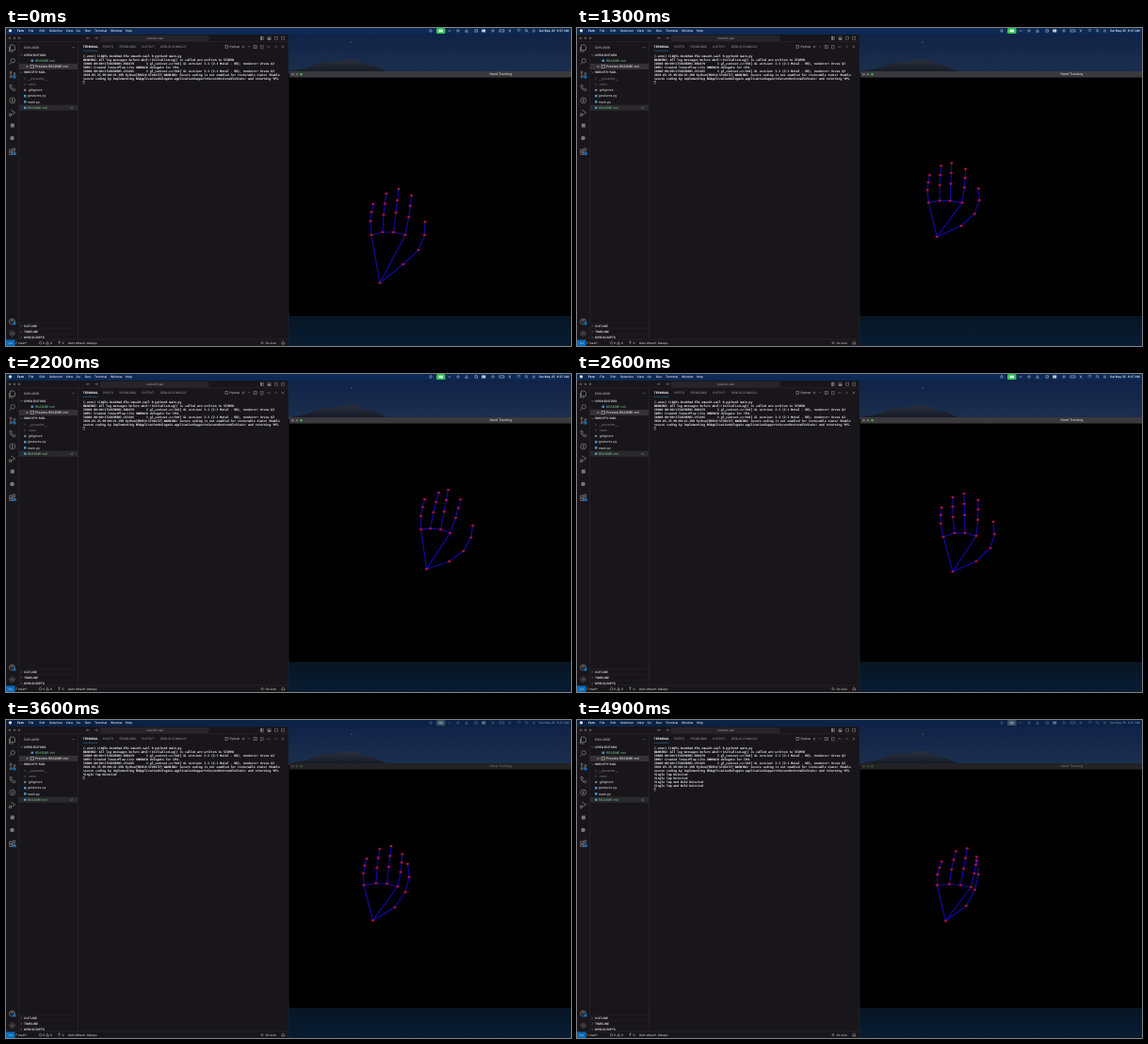
Write an HTML page that moves like this. It is 600 px wide and 338 px high and loops after 5 s.

```html
<!DOCTYPE html>
<html lang="en">
<head>
<meta charset="utf-8">
<title>Hand tracking desktop</title>
<style>
  html, body { margin: 0; width: 100%; height: 100%; overflow: hidden; background: #000; }
  svg { display: block; width: 100vw; height: 100vh; }
  text { font: 500 3.2px Inter, sans-serif; fill: #ccc; white-space: pre; text-rendering: geometricPrecision; }
  .b { font-weight: 700; }
  .m { font: 3.1px "DejaVu Sans Mono", "Liberation Mono", monospace; fill: #eee; stroke: #eee; stroke-width: .12; }
  .s { font-size: 3.45px; }
  .i { fill: none; stroke: #858585; stroke-width: .55; }
  .w { stroke: #c3cad6; }
</style>
</head>
<body>
<svg viewBox="0 0 600 338" preserveAspectRatio="none">
  <defs>
    <linearGradient id="sky" x1="0" y1="0" x2="0" y2="1">
      <stop offset="0" stop-color="#0f2145"/><stop offset="1" stop-color="#1b2f4e"/>
    </linearGradient>
    <linearGradient id="sea" x1="0" y1="0" x2="0" y2="1">
      <stop offset="0" stop-color="#081420"/><stop offset=".4" stop-color="#07182a"/><stop offset="1" stop-color="#091c31"/>
    </linearGradient>
    <linearGradient id="rock" x1="0" y1="0" x2="0" y2="1">
      <stop offset="0" stop-color="#2b303c"/><stop offset="1" stop-color="#151b27"/>
    </linearGradient>
  </defs>

  <!-- wallpaper -->
  <rect width="600" height="48" fill="url(#sky)"/>
  <rect y="304" width="600" height="34" fill="url(#sea)"/>
  <path d="M301 46L318 43 331 38 340 36 352 35.500 362 33 371 33.500 381 38 392 40.500 404 46Z" fill="url(#rock)"/>
  <g fill="#7f8ea3"><circle cx="367" cy="15" r=".6"/><circle cx="437" cy="13" r=".3"/></g>

  <!-- menu bar -->
  <rect id="bar" width="600" height="6.5" fill="#0c2a55"/>
  <circle cx="4.5" cy="2.8" r="1.6" fill="#e8ecf0"/>
  <g id="menu"></g>
  <g id="tray">
    <rect id="cam" x="457" y="0" width="9.5" height="6" rx="1.5" fill="#2fc653"/>
    <rect x="459.5" y="1.8" width="4.5" height="2.5" rx=".6" fill="#e9fff0"/>
    <g class="i w">
      <circle cx="451" cy="2.9" r="1.3"/><path d="M469.500 3h3"/>
      <circle cx="480" cy="2.9" r="1.2"/><path d="M487.500 4.200l1.500-2.600 1.500 2.600zM498 1.700h2.500v2.500H498z"/>
      <path d="M505.500 1.700h3.500v2.500h-3.500z" fill="#c3cad6"/>
      <circle cx="517" cy="2.9" r="1.2"/><path d="M524 1.800h5v2.200h-5zM534 1.500l2 2.800M536 1.500l-2 2.800"/>
      <path d="M542.500 2.200q2-1.600 4 0M543.500 3.500q1-.8 2 0"/>
      <circle cx="552.500" cy="2.600" r="1.100"/><path d="M553.400 3.500l1.100 1.100M559 2.200h3M559 3.800h3"/>
    </g>
  </g>

  <!-- editor window -->
  <rect y="7" width="300" height="331" fill="#18161a"/>
  <path d="M0 14.500H300M13.500 14.500V331M76.500 14.500V331M0 331H300M300 7V338" stroke="#2a282c" stroke-width=".5"/>
  <g fill="#525157"><circle cx="4" cy="10.800" r="1.400"/><circle cx="9" cy="10.800" r="1.400"/><circle cx="14" cy="10.800" r="1.400"/></g>
  <rect x="100" y="8.300" width="115" height="5.200" rx="1.200" fill="#262428" stroke="#363438" stroke-width=".4"/>
  <g class="i">
    <path d="M89 10.800h-3.500l1.300-1.300M85.500 10.800l1.300 1.300M94 10.800h3.500l-1.300-1.300M97.500 10.800l-1.300 1.300"/>
    <path d="M270.500 9.300h3v3h-3zM278 9.300h3v3h-3zM285.500 9.300h3v3h-3zM292.500 9.300h3v3h-3z"/>
    <path d="M270.500 9.300h1.300v3h-1.300zM278 11h3v1.300h-3z" fill="#858585"/>
    <path d="M252 18.400v3.200M250.400 20h3.200M257 19.300l1 1 1-1M263 18.500h3.500v3h-3.500zM264.700 18.500v3M270 18.700h3.500M270.500 18.700v3.200h2.500v-3.200M277 20h3.500M285 20.700l1.500-1.400 1.500 1.400M292.500 18.700l2.600 2.600M295.100 18.700l-2.600 2.600"/>
    <path d="M70 20.500h3.500" stroke-dasharray=".7 .6"/>
  </g>

  <!-- activity bar -->
  <g class="i" style="stroke-width:.7">
    <path d="M4.500 18h3.500l1.500 1.500v4h-5zM3.500 20v5h4.500"/>
    <circle cx="7.200" cy="34.800" r="2.200"/><path d="M5.600 36.500l-2.200 2.300"/>
    <circle cx="5" cy="47" r="1"/><circle cx="5" cy="52" r="1"/><circle cx="9" cy="48.500" r="1"/><path d="M5 48v3M9 49.500q0 1.500-3 1.800"/>
    <path d="M4 60.500l1.500-.3 1 1.900-1 1q.8 1.500 2 2l1.200-.9 1.500 1.300-1 1.300Q4 66 4 60.500z"/>
    <circle cx="6.800" cy="77" r="3"/><path d="M7.400 75l-1.400 2.200h1.600l-1.400 2.100"/>
    <path d="M5 87l4.700 2.900L5 92.800M3.500 91h2v2.500h-2z"/>
    <path d="M3.700 129h2.600v2.600h-2.600zM3.700 132h2.600v2.600h-2.600zM6.700 132h2.600v2.600h-2.600zM7.300 128h2.400v2.400h-2.400z"/>
    <circle cx="6.500" cy="312" r="3"/><circle cx="6.500" cy="311" r="1"/>
    <circle cx="6.500" cy="324.700" r="2.700" stroke-dasharray="1.200 .7"/><circle cx="6.500" cy="324.700" r="1"/>
  </g>
  <g fill="#77767a"><rect x="4.800" y="101.600" width="4" height="4"/><circle cx="6.500" cy="117" r="2.300"/></g>
  <g fill="#0a6cba"><circle cx="9" cy="52" r="1.800"/><circle cx="9.300" cy="133.500" r="1.800"/><circle cx="9" cy="314" r="1.800"/><rect y="331.500" width="9.500" height="6.500"/></g>

  <!-- explorer -->
  <rect x="13.800" y="37.900" width="62.400" height="6.100" fill="#343236"/>
  <rect x="13.800" y="81.700" width="62.400" height="6.100" fill="#2a292c"/>
  <path d="M13.800 313.500H76M13.800 319.700H76M13.800 325.800H76" stroke="#2a282c" stroke-width=".4"/>
  <g class="i">
    <path d="M15.300 28l1.200 1.300 1.200-1.300M15.300 46.400l1.200 1.300 1.200-1.300"/>
    <path d="M19.400 52.700l1.100 1.100-1.100 1.100M19.400 58.900l1.100 1.100-1.100 1.100"/>
    <path d="M15.600 315.400l1.200 1.200-1.200 1.200M15.600 321.500l1.200 1.200-1.200 1.200M15.600 327.600l1.200 1.200-1.200 1.200"/>
    <path d="M21.500 40l1.800 1.800M23.300 40l-1.800 1.800M26 39.500h3.500v2.800H26z" stroke="#c8c8c8"/>
  </g>
  <g fill="#4b93c8"><rect x="26.500" y="33.600" width="2.600" height="2.300"/><rect x="19" y="71" width="2.500" height="2.500"/><rect x="19" y="77.200" width="2.500" height="2.500"/><rect x="19" y="83.600" width="2.600" height="2.300"/></g>
  <circle cx="20.200" cy="66" r="1.200" fill="#7c8489"/>
  <path d="M81.500 24.300H97.500" stroke="#2a78b8" stroke-width=".5"/>
  <rect x="233" y="18.600" width="2.700" height="2.700" fill="none" stroke="#aaa" stroke-width=".5"/>
  <g class="i" style="stroke:#aaa">
    <circle cx="36.500" cy="334.700" r="1.300"/><path d="M42.500 336l1.500-2.700 1.500 2.700zM56.500 333v3.200M55.200 334l1.300-1 1.300 1M11.500 333l-.9 3"/>
    <circle cx="272" cy="334.700" r="1.100"/><path d="M292.700 336h3.200l-.6-2.200q-1-1.400-2 0z"/>
  </g>
  <g id="ui"></g>
  <g id="term"></g>
  <rect id="cursor" x="82" width="1.500" height="3.400" fill="none" stroke="#aaa" stroke-width=".4"/>

  <!-- tracking window -->
  <rect x="301" y="46" width="299" height="260" fill="#000"/>
  <rect id="head" x="301" y="46" width="299" height="6.600" fill="#3a393b"/>
  <g id="lights"><circle cx="304.500" cy="49.300" r="1.300" fill="#77716f"/><circle cx="309" cy="49.300" r="1.300" fill="#6b6b6b"/><circle cx="313.500" cy="49.300" r="1.300" fill="#46b052"/></g>
  <g id="title"></g>
  <path id="bones" fill="none" stroke="#1409a6" stroke-width="1.150" stroke-linejoin="round"/>
  <g id="dots" fill="#a5123f"></g>
</svg>

<script>
const NS = 'http://www.w3.org/2000/svg';
const $ = id => document.getElementById(id);

function add(parent, tag, attrs, str) {
  const el = document.createElementNS(NS, tag);
  for (const k in attrs) el.setAttribute(k, attrs[k]);
  if (str) el.textContent = str;
  return parent.appendChild(el);
}
// Baseline sits just below the given centre line.
function label(parent, x, y, str, cls = '', fill = '') {
  return add(parent, 'text', { x, y: y + 1.15, class: cls, style: fill && 'fill:' + fill }, str);
}

const menu = $('menu'), ui = $('ui'), term = $('term');
label(menu, 12, 2.8, 'Fern', 'b', '#fff');
[[24, 'File'], [35.5, 'Edit'], [46, 'Selection'], [63.5, 'View'], [74.5, 'Go'], [84, 'Run'],
 [94, 'Terminal'], [111, 'Window'], [127, 'Help']]
  .forEach(([x, s]) => label(menu, x, 2.8, s, '', '#f0f3f6'));
label($('tray'), 566, 2.8, 'Sat May 25  9:07 AM', '', '#fff');

label(ui, 149, 10.9, 'smooth-sail', '', '#9a9a9a');
label(ui, 19, 20.6, 'EXPLORER', '', '#b8b8b8');
label(ui, 19, 28.8, 'OPEN EDITORS', 'b');
label(ui, 31, 34.7, 'README.md', 's', '#6fb98a');
label(ui, 31, 41, 'Preview README.md', 's', '#e2e2e2');
label(ui, 19, 47.2, 'SMOOTH-SAIL', 'b');
[['__pycache__', '#777'], ['.venv', '#777'], ['.gitignore', '#ccc'], ['gestures.py', '#ccc'],
 ['main.py', '#ccc'], ['README.md', '#6fb98a']]
  .forEach(([s, c], i) => label(ui, 23, 53.8 + i * 6.18, s, 's', c));
label(ui, 68.5, 84.7, 'U', '', '#6fb98a');
['OUTLINE', 'TIMELINE', 'NPM SCRIPTS'].forEach((s, i) => label(ui, 19, 316.6 + i * 6.1, s, 'b'));
[[103, 'PORTS'], [120.5, 'PROBLEMS'], [144, 'OUTPUT'], [164, 'DEBUG CONSOLE']]
  .forEach(([x, s]) => label(ui, x, 20, s, '', '#8c8c8c'));
label(ui, 81.5, 20, 'TERMINAL', 'b', '#eee');
label(ui, 237.5, 20, 'Python');
label(ui, 2.8, 334.7, '><', '', '#fff');
[[13, 'main*'], [39, '0'], [47, '0'], [59.5, '0'], [66, 'Auto Attach: Always'], [275.5, 'Go Live']]
  .forEach(([x, s]) => label(ui, x, 334.7, s));

const gl = n => `I0000 00:00:1716638801.${n}       1 gl_context.cc:344] GL version: 2.1 (2.1 Metal - 88), renderer: Orvex Q2`;
const row = i => 30 + i * 3.98;
[
  '(.venv) tik@Ts-DeskPad-Elm smooth-sail % python3 main.py',
  'WARNING: All log messages before absl::InitializeLog() is called are written to STDERR',
  gl(869479),
  'INFO: Created TensorFlow Lite XNNPACK delegate for CPU.',
  gl(211445),
  '2024-05-25 09:06:41.198 Python[89654:5744472] WARNING: Secure coding is not enabled for restorable state! Enable',
  'secure coding by implementing NSApplicationDelegate.applicationSupportsSecureRestorableState: and returning YES.'
].forEach((s, i) => label(term, 82, row(i), s, 'm'));

const events = [[3300, 'Single Tap Detected'], [3700, 'Single Tap Detected'],
  [4300, 'Single Tap and Hold Detected'], [4700, 'Single Tap and Hold Detected']]
  .map(([at, s], i) => ({ at, el: label(term, 82, row(7 + i), s, 'm') }));

const title = label($('title'), 513.5, 49.3, 'Hand Tracking', 's', '#d8d8d8');

// Pose: wrist, three thumb points, then base and tip of index, middle, ring, little finger.
// All but the wrist are relative to it.
const poses = {
  low:   [397, 271, 25, -20, 41, -35, 48, -65, 27, -51, 33.5, -93, 14.5, -54, 20, -100, 3, -54, 7, -95, -9, -51, -7, -84],
  left:  [376, 223, 26, -12, 40, -25, 44, -52, 27, -36, 30, -72, 14, -38, 15, -78, 3, -38, 4, -75, -9, -36, -8, -65],
  right: [459, 209, 24, -8, 39, -19, 49, -46, 25, -38, 36, -74, 15, -42, 23, -84, 4, -43, 13, -81, -6, -42, -2, -74],
  open:  [399, 210, 25, -11, 40, -25, 43, -53, 25, -38, 27, -76, 13, -41, 12, -83, 2, -41, 0, -79, -10, -37, -12, -68],
  ready: [388, 213, 25, -12, 38, -27, 41, -56, 26, -36, 30, -73, 14, -40, 16, -81, 3, -40, 4, -78, -10, -37, -9, -68],
  pinch: [390, 213, 22, -16, 31, -33, 33, -64, 27, -36, 33, -68, 16, -38, 23, -77, 4, -39, 11, -74, -9, -38, -4, -63]
};
const keys = [
  [0, 'low'], [700, 'left'], [950, 'left', 0, 8], [1200, 'left'], [1800, 'right'],
  [2050, 'right', 11, -7], [2300, 'right', -25, 1], [2400, 'right', -25, 1], [2600, 'open'], [2700, 'open'],
  [3100, 'ready'], [3300, 'pinch'], [3500, 'ready', 1], [3700, 'pinch'], [4100, 'pinch'], [4900, 'pinch', 1.4, .5]
].map(([t, name, dx = 0, dy = 0]) => {
  const v = [...poses[name]];
  v[0] += dx;
  v[1] += dy;
  return { t, v };
});

function poseAt(t) {
  const i = keys.findIndex(k => k.t >= t);
  if (i < 0) return keys[keys.length - 1].v;
  if (!i) return keys[0].v;
  const a = keys[i - 1], b = keys[i];
  const u = (t - a.t) / (b.t - a.t), e = u * u * (3 - 2 * u);
  return a.v.map((p, j) => p + (b.v[j] - p) * e);
}

const bend = [.8, 0, -.8, -1.8];
function joints(v) {
  const at = i => [v[0] + v[2 * i], v[1] + v[2 * i + 1]];
  const mix = (a, b, f, dx) => [a[0] + (b[0] - a[0]) * f + dx, a[1] + (b[1] - a[1]) * f];
  const thumb = [at(1), at(2), mix(at(2), at(3), .53, 2.8), at(3)];
  const fingers = bend.map((d, i) => {
    const a = at(4 + 2 * i), b = at(5 + 2 * i);
    return [a, mix(a, b, .45, d), mix(a, b, .74, d * .7), b];
  });
  return { wrist: [v[0], v[1]], thumb, fingers };
}

const dots = Array.from({ length: 21 }, () => add($('dots'), 'ellipse', { rx: 1.6, ry: 1.25 }));
const line = pts => 'M' + pts.map(p => p.map(n => n.toFixed(2)).join(' ')).join('L');

function drawHand(t) {
  const { wrist, thumb, fingers } = joints(poseAt(t));
  const knuckles = fingers.map(f => f[0]);
  $('bones').setAttribute('d', [[wrist, ...thumb], [wrist, ...knuckles, wrist], ...fingers].map(line).join(''));
  [wrist, ...thumb, ...fingers.flat()].forEach(([x, y], i) => {
    dots[i].setAttribute('cx', x);
    dots[i].setAttribute('cy', y);
  });
}

function draw(now) {
  const t = Math.floor(now % 5000 / 100) * 100;
  const away = t >= 3300;
  let shown = 0;
  for (const e of events) {
    const on = t >= e.at;
    e.el.style.display = on ? '' : 'none';
    shown += on;
  }
  $('cursor').setAttribute('y', row(7 + shown) - 1.7);
  $('bar').setAttribute('fill', away ? '#0b2347' : '#0c2a55');
  $('tray').style.opacity = away ? .45 : 1;
  $('cam').setAttribute('fill', away ? '#74808c' : '#2fc653');
  $('head').setAttribute('fill', away ? '#232224' : '#3a393b');
  $('lights').style.opacity = away ? .4 : 1;
  title.style.fill = away ? '#6c6c6c' : '#d8d8d8';
  drawHand(t);
}

function tick() {
  draw(performance.now());
  requestAnimationFrame(tick);
}
tick();
</script>
</body>
</html>
```
